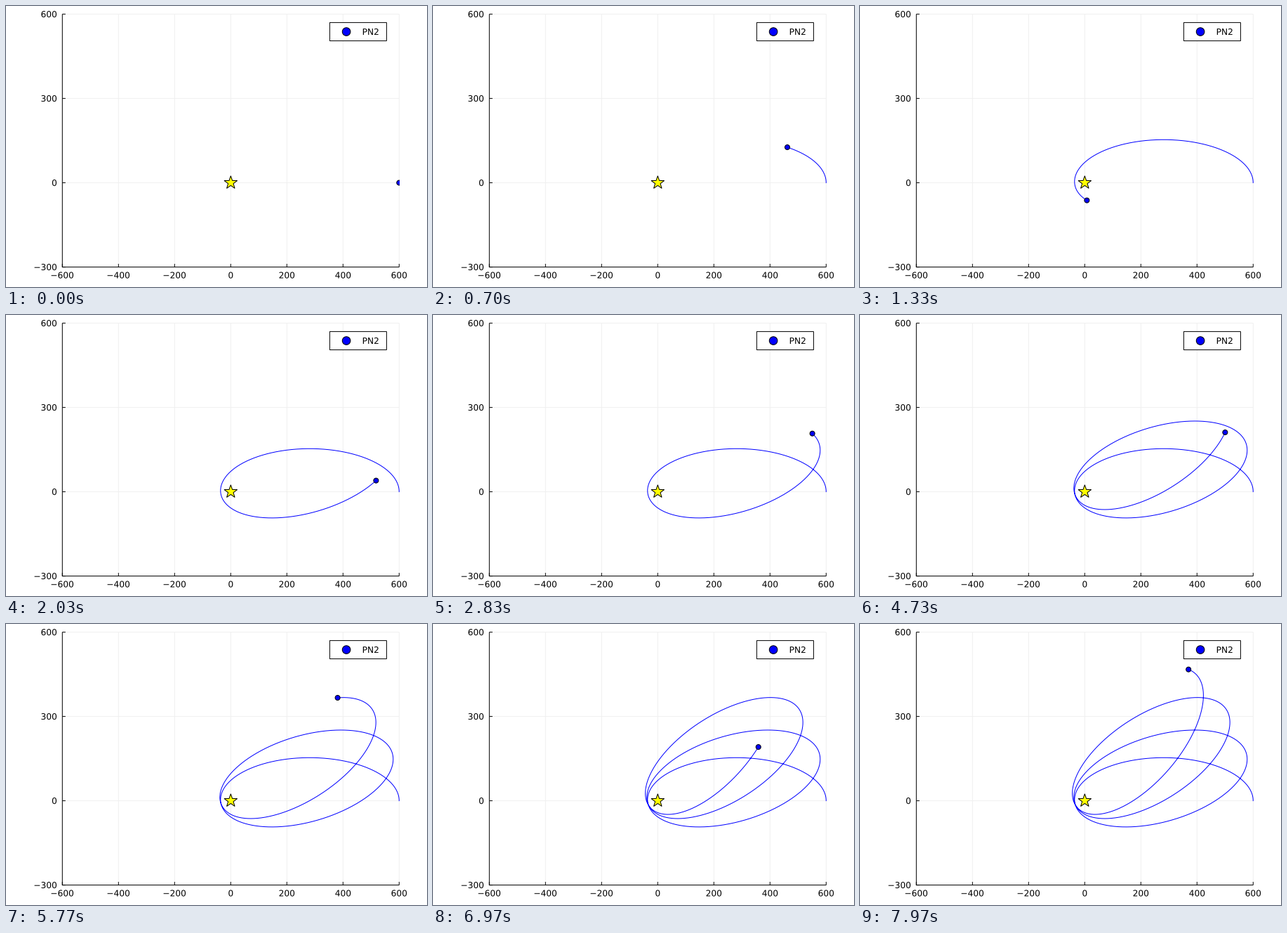
Animation, 600 px wide and 400 px high, one loop 8 s. Source, as a matplotlib script:

```python
import numpy as np
import matplotlib.pyplot as plt
from matplotlib.animation import FuncAnimation
from matplotlib.patches import Circle, PathPatch, Polygon, Rectangle
from matplotlib.textpath import TextPath
from matplotlib.transforms import Affine2D

W, H, DPI = 600, 400, 100
TICKS, TICK_MS = 400, 20            # picture steps at 30 per second
PX = 72 / DPI                       # one pixel in points
CX, CY, SCALE = 320.3, 251.6, 0.4   # pixel position of (0, 0), pixels per unit
LEFT, RIGHT = CX - 240, CX + 240
TOP, BOTTOM = CY - 240, CY + 120
FONT_PX = 12.2
CAP = 0.729 * FONT_PX               # height of capitals and digits

# Precessing ellipse, starting at its farthest point
R_MAX, ECC, ECC_T = 600, 0.8865, 0.876
ADVANCE = 376.37 / 360              # angle swept per radial period, in turns
STEPS_PER_RAD = 12.466

plt.rcParams["font.family"] = "DejaVu Sans"


def to_px(x, y):
    return CX + SCALE * x, CY - SCALE * y


def orbit(n=4000):
    """Mean anomaly and pixel path of the orbit."""
    ecc_anom = np.linspace(0, 20, n)
    mean = ecc_anom + ECC_T * np.sin(ecc_anom)
    r = R_MAX / (1 + ECC) * (1 + ECC * np.cos(ecc_anom))
    half = ecc_anom / 2
    true = 2 * np.unwrap(np.arctan2(np.sqrt(1 - ECC) * np.sin(half),
                                    np.sqrt(1 + ECC) * np.cos(half)))
    angle = true * ADVANCE
    return (mean, *to_px(r * np.cos(angle), r * np.sin(angle)))


def star(cx, cy, outer, inner):
    a = np.pi / 2 + np.arange(10) * np.pi / 5
    r = np.where(np.arange(10) % 2, inner, outer)
    return np.column_stack([cx + r * np.cos(a), cy - r * np.sin(a)])


fig = plt.figure(figsize=(W / DPI, H / DPI), dpi=DPI, facecolor="white")
ax = fig.add_axes([0, 0, 1, 1])
ax.set_xlim(0, W)
ax.set_ylim(H, 0)
ax.axis("off")


def line(xs, ys, color="black", z=2):
    ax.plot(xs, ys, color=color, lw=PX, zorder=z, snap=False,
            solid_capstyle="butt")


def dot(x, y, radius, z):
    return ax.add_patch(Circle((x, y), radius, fc="blue", ec="black", lw=PX,
                               zorder=z))


def text(x, middle, s, align):
    """Text whose digits are centred on the height `middle`."""
    path = TextPath((0, 0), s, size=FONT_PX)
    box = path.get_extents()
    x -= box.x0 + align * box.width
    place = Affine2D().scale(1, -1).translate(x, middle + CAP / 2)
    ax.add_patch(PathPatch(place.transform_path(path), fc="black", lw=0,
                           snap=False, zorder=8))


def label(value):
    return str(value).replace("-", "\u2212")


# Grid, ticks and tick labels
for v in range(-600, 601, 200):
    x = to_px(v, 0)[0]
    line([x, x], [TOP, BOTTOM], "#f0f0f0", 1)
    line([x, x], [BOTTOM, BOTTOM - 4.5])
    text(x, 383.1, label(v), 0.5)
for v in range(-300, 601, 300):
    y = to_px(0, v)[1]
    line([LEFT, RIGHT], [y, y], "#f0f0f0", 1)
    line([LEFT, LEFT + 4.5], [y, y])
    text(72, y, label(v), 1)

line([LEFT, LEFT], [TOP, BOTTOM + 0.5])
line([LEFT, RIGHT], [BOTTOM, BOTTOM])

# Legend
ax.add_patch(Rectangle((461.4, 23.6), 81, 26, fc="white", ec="black",
                       lw=PX, snap=False, zorder=7))
dot(485.1, 36.6, 5.8, 8)
text(508.8, 36.6, "PN2", 0)

# Moving parts
frame_box = Rectangle((LEFT, TOP), RIGHT + 0.3 - LEFT, BOTTOM - TOP,
                      transform=ax.transData)
trail, = ax.plot([], [], color="blue", lw=PX, zorder=3)
ax.add_patch(Polygon(star(CX, CY, 9.8, 3.9), fc="yellow", ec="black",
                     lw=PX, joinstyle="miter", snap=False, zorder=4))
planet = dot(CX, CY, 3.5, 5)
for part in (trail, planet):
    part.set_clip_path(frame_box)

MEAN, PATH_X, PATH_Y = orbit()


def draw(tick):
    step = (3 * tick + 2) // 5
    m = step / STEPS_PER_RAD
    x, y = np.interp(m, MEAN, PATH_X), np.interp(m, MEAN, PATH_Y)
    n = np.searchsorted(MEAN, m)
    trail.set_data(np.append(PATH_X[:n], x), np.append(PATH_Y[:n], y))
    planet.center = x, y
    return trail, planet


anim = FuncAnimation(fig, draw, frames=TICKS, init_func=lambda: draw(0),
                     interval=TICK_MS, repeat=True, repeat_delay=0)
plt.show()
```
